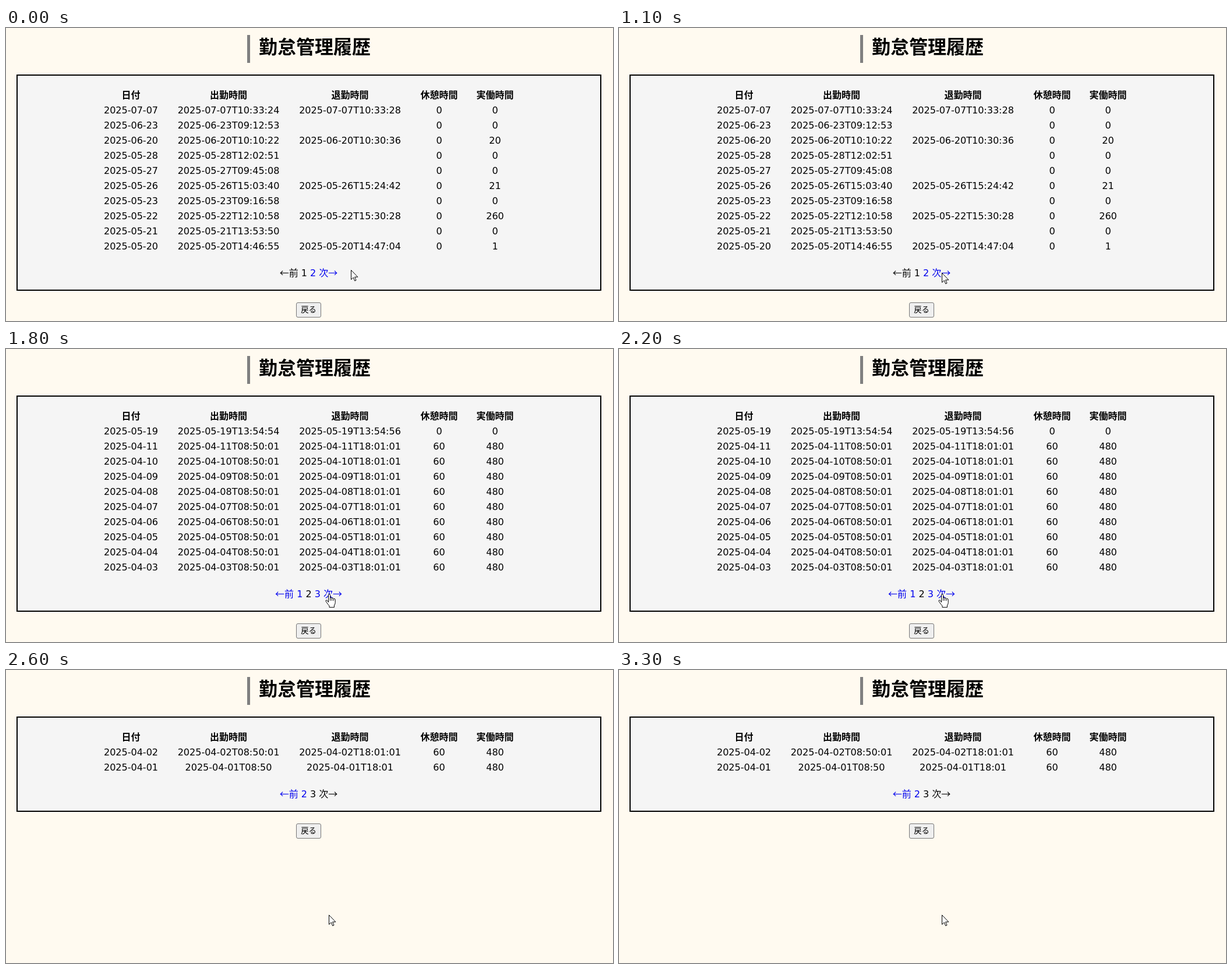
These frames come from a looping animation (1042x504 px, 3400 ms). An HTML page:

```html
<!DOCTYPE html>
<html lang="ja">
<head>
<meta charset="utf-8">
<title>勤怠管理履歴</title>
<style>
html, body { margin: 0; width: 100%; height: 100%; overflow: hidden; }
body {
  position: relative;
  background: #fffaf0;
  color: #000;
  font: 16px/26px "DejaVu Sans", "Noto Sans CJK JP", "Noto Sans CJK", sans-serif;
  font-kerning: none;
}
h1 {
  position: absolute; left: 414px; top: 12px; margin: 0;
  height: 48px; padding-left: 15px; border-left: 5px solid #808080;
  font-size: 32px; line-height: 43px; white-space: nowrap;
}
.page { position: absolute; inset: 0; animation: 3.4s step-end infinite; }
#p1 { animation-name: first; }
#p2 { animation-name: second; }
#p3 { animation-name: third; }
.box {
  position: absolute; left: 18px; top: 80px; width: 1004px;
  box-sizing: border-box; border: 2px solid #000; background: #f5f5f5;
}
.cell, .pager { position: absolute; transform: translateX(-50%); white-space: pre; }
.head { font-weight: bold; }
.wide { font-family: "Noto Sans CJK JP", "Noto Sans CJK", sans-serif; line-height: 0; }
.link { color: #00e; }
.back {
  position: absolute; left: 498px; width: 43px; height: 26px;
  box-sizing: border-box; border: 1px solid #767676; border-radius: 3px;
  background: #efefef; font-size: 13.333px; line-height: 23px; text-align: center;
}
svg { position: absolute; overflow: visible; fill: #fff; stroke: #000; stroke-linejoin: round; }
#arrow { left: 592px; top: 416px; animation: move 3.4s infinite, point 3.4s step-end infinite; }
#hand { left: 548px; top: 421px; animation: press 3.4s step-end infinite; }

@keyframes first { 0% { visibility: visible } 41.176%, 100% { visibility: hidden } }
@keyframes second {
  0% { visibility: hidden } 41.176% { visibility: visible } 76.47%, 100% { visibility: hidden }
}
@keyframes third { 0% { visibility: hidden } 76.47%, 100% { visibility: visible } }
@keyframes move {
  0%, 23.529% { transform: none; animation-timing-function: steps(3) }
  32.353%, 100% { transform: translate(-38px, 5px) }
}
@keyframes point {
  0% { visibility: visible } 35.294% { visibility: hidden } 76.47%, 100% { visibility: visible }
}
@keyframes press {
  0% { visibility: hidden } 35.294% { visibility: visible } 76.47%, 100% { visibility: hidden }
}
</style>
</head>
<body>
<div class="page" id="p1"></div>
<div class="page" id="p2"></div>
<div class="page" id="p3"></div>
<h1>勤怠管理履歴</h1>
<svg id="arrow" width="13" height="20"><path d="M.5 .5V16.7L4.3 13.2 6.7 19 9 18 6.6 12.3H11.8Z"/></svg>
<svg id="hand" width="20" height="24">
  <path d="M5.5 14.5V2.3Q5.5 .6 7 .6T8.5 2.3V7.2Q9.8 5.8 11.4 7.6 13 6.4 14.3 8.4 16.6 7.6 17.2 10V15.5Q17 18 15.4 20V23.3H7V20.5Q4.5 18.6 3 15.8L.9 12.7Q.6 10.6 2.7 11Z"/>
  <path d="M8.5 7V12M11.4 8V12M14.3 9V12" fill="none"/>
</svg>
<script>
const COLUMNS = [214.5, 382, 590.5, 743.5, 839.5];
const HEADS = ['日付', '出勤時間', '退勤時間', '休憩時間', '実働時間'];
const TOP = 129, STEP = 26;

const row = (date, start, end, rest, work) => {
  const day = '2025-' + date;
  return [day, `${day}T${start}`, end ? `${day}T${end}` : '', rest, work];
};
const fullDay = n => row('04-' + String(n).padStart(2, '0'), '08:50:01', '18:01:01', 60, 480);

const first = [
  row('07-07', '10:33:24', '10:33:28', 0, 0),
  row('06-23', '09:12:53', '', 0, 0),
  row('06-20', '10:10:22', '10:30:36', 0, 20),
  row('05-28', '12:02:51', '', 0, 0),
  row('05-27', '09:45:08', '', 0, 0),
  row('05-26', '15:03:40', '15:24:42', 0, 21),
  row('05-23', '09:16:58', '', 0, 0),
  row('05-22', '12:10:58', '15:30:28', 0, 260),
  row('05-21', '13:53:50', '', 0, 0),
  row('05-20', '14:46:55', '14:47:04', 0, 1)
];
const second = [row('05-19', '13:54:54', '13:54:56', 0, 0)];
for (let n = 11; n > 2; n--) second.push(fullDay(n));
const third = [fullDay(2), row('04-01', '08:50', '18:01', 60, 480)];

const span = (text, link, wide) =>
  `<span class="${link ? 'link' : ''} ${wide ? 'wide' : ''}">${text}</span>`;

function build(id, rows, current, numbers) {
  const line = (cells, y, cls) => cells.map((text, i) =>
    `<div class="cell ${cls}" style="left:${COLUMNS[i]}px;top:${y}px">${text}</div>`).join('');
  const bottom = TOP + rows.length * STEP;
  const pager = [
    span('←前', current > 1, true),
    ...numbers.map(n => span(n, n !== current)),
    span('次→', current < 3, true)
  ].join(' ');
  document.getElementById(id).innerHTML =
    `<div class="box" style="height:${bottom - 17}px"></div>` +
    line(HEADS, TOP - STEP, 'head') +
    rows.map((cells, i) => line(cells, TOP + i * STEP, '')).join('') +
    `<div class="pager" style="left:519.5px;top:${bottom + 20}px">${pager}</div>` +
    `<div class="back" style="top:${bottom + 83}px">戻る</div>`;
}

build('p1', first, 1, [1, 2]);
build('p2', second, 2, [1, 2, 3]);
build('p3', third, 3, [2, 3]);
</script>
</body>
</html>
```
